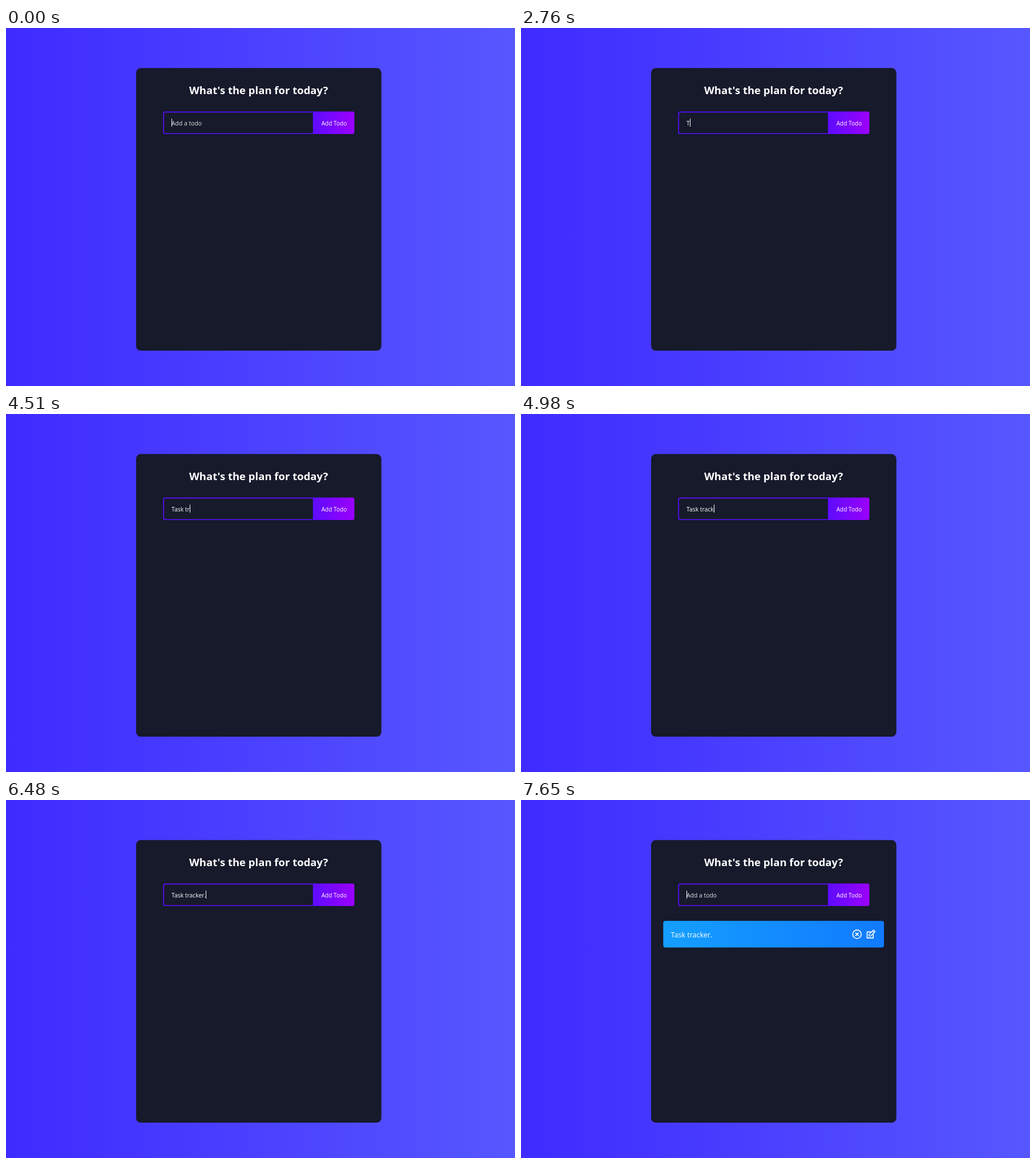
These frames come from a looping animation (892x628 px, 8 s). An HTML page with a canvas:

```html
<!DOCTYPE html>
<html lang="en">
<head>
<meta charset="utf-8">
<title>Todo list</title>
<style>
  html, body { margin: 0; width: 100%; height: 100%; overflow: hidden; }
  canvas { display: block; }
</style>
</head>
<body>
<canvas id="stage" width="892" height="628"></canvas>
<script>
const ctx = document.getElementById('stage').getContext('2d');
const LOOP = 8000;
const ADDED = 7650;
const BLINK = 525;
const FOCUSED = -500;
const INPUT_SIZE = 10.4;
// Typing comes in bursts with a steady gap between letters.
const BURSTS = [
  { letters: 'T', at: 2760, gap: 0 },
  { letters: 'ask ', at: 3070, gap: 166 },
  { letters: 'tracker', at: 4340, gap: 150 },
  { letters: '.', at: 6480, gap: 0 },
];
const KEYS = BURSTS.flatMap(({ letters, at, gap }) =>
  [...letters].map((letter, i) => ({ letter, time: at + i * gap })));
const spell = keys => keys.map(key => key.letter).join('');

function across(x0, x1, from, to) {
  const g = ctx.createLinearGradient(x0, 0, x1, 0);
  g.addColorStop(0, from);
  g.addColorStop(1, to);
  return g;
}

function box(x, y, w, h, radii, fill) {
  ctx.beginPath();
  ctx.roundRect(x, y, w, h, radii);
  ctx.fillStyle = fill;
  ctx.fill();
}

function text(str, x, y, size, { weight = 500, color = '#fff', align = 'left' } = {}) {
  ctx.font = `${weight} ${size}px "Open Sans", "Noto Sans", sans-serif`;
  ctx.textAlign = align;
  ctx.fillStyle = color;
  ctx.fillText(str, x, y);
  return ctx.measureText(str).width;
}

// Draws on a 24-unit grid at the icon size.
function icon(x, y, draw) {
  ctx.save();
  ctx.translate(x, y);
  ctx.scale(0.827, 0.827);
  ctx.strokeStyle = '#fff';
  ctx.lineWidth = 2;
  draw();
  ctx.restore();
}

const strokePath = path => ctx.stroke(new Path2D(path));

function closeIcon() {
  ctx.beginPath();
  ctx.arc(12, 12, 9, 0, Math.PI * 2);
  ctx.stroke();
  strokePath('M8.5 8.5l7 7m0-7l-7 7');
}

function editIcon() {
  ctx.lineJoin = 'round';
  strokePath('M12.5 7H4v13h13v-8.5');
  ctx.lineWidth = 1.7;
  strokePath('M8 16v-3.4L17.6 3l3.4 3.4-9.6 9.6zM15.6 5.5l2.9 2.9');
}

function drawPage() {
  ctx.fillStyle = across(0, 892, 'rgb(63,43,255)', 'rgb(87,87,255)');
  ctx.fillRect(0, 0, 892, 628);
  box(228, 70.2, 429.8, 495.9, 8.3, '#161a2b');
  text("What's the plan for today?", 442.6, 116, 18.5, { weight: 700, align: 'center' });

  ctx.beginPath();
  ctx.roundRect(276.2, 147.4, 262.5, 37.8, [2.8, 0, 0, 2.8]);
  ctx.strokeStyle = '#5d0cff';
  ctx.lineWidth = 1.65;
  ctx.stroke();
  box(538.3, 146.5, 72.2, 39.6, [0, 3.3, 3.3, 0],
    across(538, 610, 'rgb(93,12,255)', 'rgb(155,0,250)'));
  text('Add Todo', 575, 170.5, 10.1, { align: 'center' });
}

function drawInput(t) {
  const pressed = t < ADDED ? KEYS.filter(key => t >= key.time) : [];
  let caretX = 290;
  if (pressed.length) caretX += text(spell(pressed), 290, 170.5, INPUT_SIZE);
  else text('Add a todo', 290, 170.5, INPUT_SIZE, { color: '#e2e2e2' });

  // Each keystroke restarts the blink with the caret shown.
  const lastInput = t >= ADDED ? ADDED : pressed.at(-1)?.time ?? FOCUSED;
  if (Math.floor((t - lastInput) / BLINK) % 2) return;
  ctx.fillStyle = '#fff';
  ctx.fillRect(Math.round(caretX), 159, 1, 14);
}

function drawItem() {
  box(249.3, 212, 386.8, 46.8, 4.1,
    across(249, 636, 'rgb(20,159,255)', 'rgb(17,122,255)'));
  text(spell(KEYS), 262.6, 240.5, 12.5);
  icon(578.9, 225.6, closeIcon);
  icon(603.2, 225.6, editIcon);
}

function frame(now) {
  const t = Math.max(0, now - start) % LOOP;
  drawPage();
  drawInput(t);
  if (t >= ADDED) drawItem();
  requestAnimationFrame(frame);
}

const start = performance.now();
frame(start);
</script>
</body>
</html>
```
